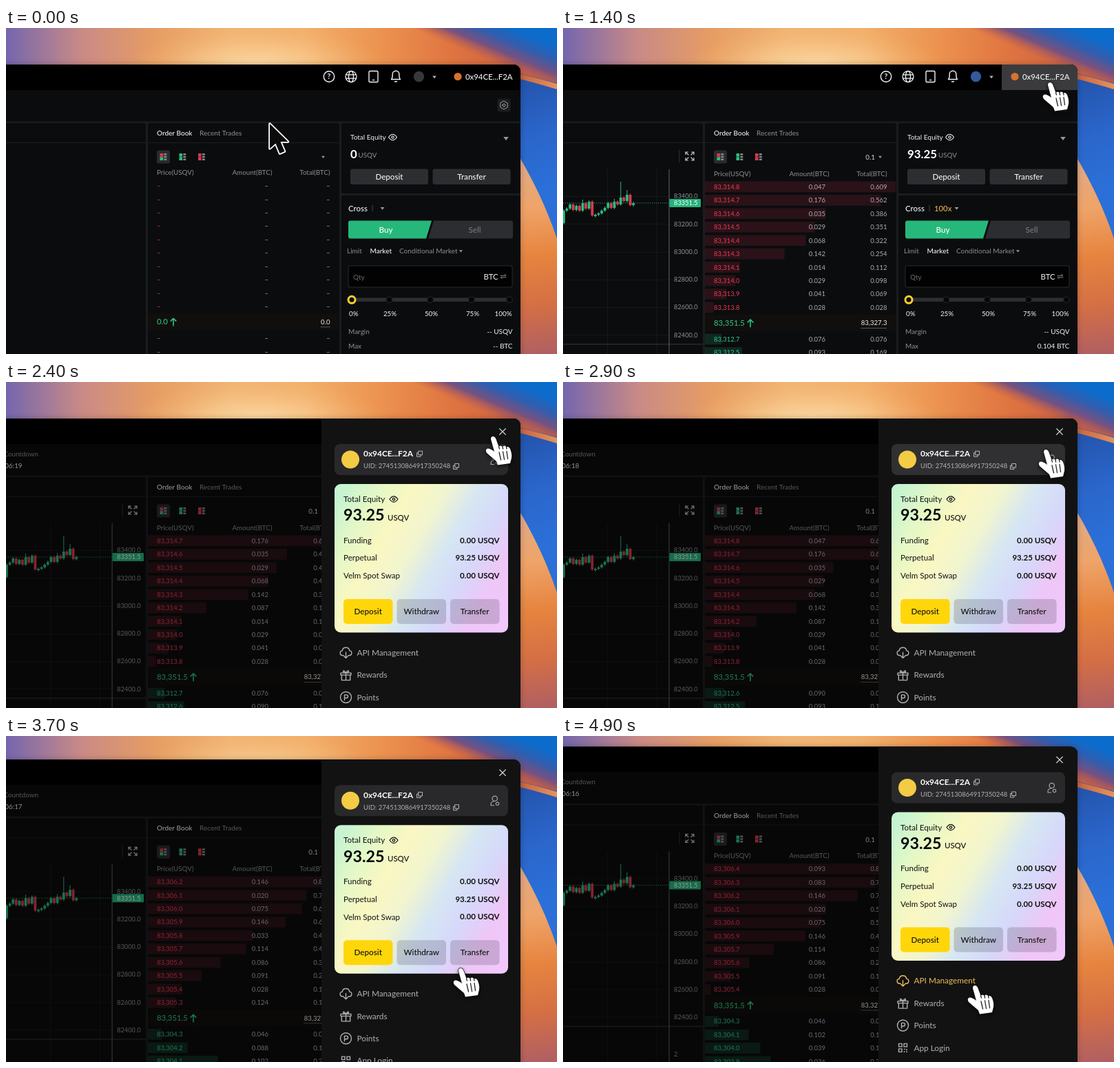
Write an HTML page with a canvas that moves like this. It is 800 px wide and 473 px high and loops after 5 s.

```html
<!DOCTYPE html>
<html lang="en">
<head>
<meta charset="utf-8">
<title>Trading account menu</title>
<style>
html, body { margin: 0; width: 100%; height: 100%; overflow: hidden; background: #000; }
canvas { display: block; width: 800px; height: 473px; }
</style>
</head>
<body>
<canvas id="stage" width="800" height="473"></canvas>
<script>
const c = document.getElementById('stage').getContext('2d');
const LOOP = 5000, STEP = 100;
const FONT = 'Lato, "Open Sans", sans-serif';
const COIN = 'USQV', WALLET = '0x94CE...F2A', UID = 'UID: 2745130864917350248';
const RED = '#de384f', GREEN = '#2bbd7e', WHITE = '#f2f2f2', GRAY = '#8e8f92', PANEL = '#0b0c0e';

// ---- drawing helpers
function txt(s, x, y, size, color, align = 'left', weight = 400) {
  c.font = `${weight} ${size}px ${FONT}`;
  c.textAlign = align;
  c.fillStyle = color;
  c.fillText(s, x, y + size * 0.36);
}
function box(x, y, w, h, color, r = 0) {
  c.beginPath();
  c.roundRect(x, y, w, h, r);
  c.fillStyle = color;
  c.fill();
}
function disc(x, y, r, color) {
  c.beginPath();
  c.arc(x, y, r, 0, 7);
  c.fillStyle = color;
  c.fill();
}
function ring(x, y, r, color, lw = 1.3) {
  c.beginPath();
  c.arc(x, y, r, 0, 7);
  c.strokeStyle = color;
  c.lineWidth = lw;
  c.stroke();
}
function icon(d, x, y, color, lw = 1.3, fill) {
  const p = new Path2D(d);
  c.save();
  c.translate(x, y);
  c.lineWidth = lw;
  c.lineJoin = c.lineCap = 'round';
  if (color) { c.strokeStyle = color; c.stroke(p); }
  if (fill) { c.fillStyle = fill; c.fill(p); }
  c.restore();
}
function shape(d, fill) { icon(d, 0, 0, null, 0, fill); }
function fade(g, colors) {
  colors.forEach((v, i) => g.addColorStop(i / (colors.length - 1), v));
  return g;
}
const grad = (x0, y0, x1, y1, ...colors) => fade(c.createLinearGradient(x0, y0, x1, y1), colors);
const caret = (x, y, s = 2.5, color = '#9a9a9d') =>
  icon(`M${-s} ${-s / 2}H${s}L0 ${s * 0.8}Z`, x, y, null, 0, color);

const ICON = {
  globe: 'M-8 0A8 8 0 1 0 8 0A8 8 0 1 0 -8 0ZM-3.5 0A3.5 8 0 1 0 3.5 0A3.5 8 0 1 0 -3.5 0ZM-7.5 -2.7H7.5M-7.5 2.7H7.5',
  phone: 'M-5 -8H5Q6.5 -8 6.5 -6.5V6.5Q6.5 8 5 8H-5Q-6.5 8 -6.5 6.5V-6.5Q-6.5 -8 -5 -8ZM-1 5H1',
  bell: 'M-6.5 4.5C-4.5 2.5 -4.8 0 -4.8 -3A4.8 4.8 0 0 1 4.8 -3C4.8 0 4.5 2.5 6.5 4.5ZM-1.5 7.7H1.5',
  eye: 'M-6 0Q0 -8.4 6 0Q0 8.4 -6 0ZM-1.7 0A1.7 1.7 0 1 0 1.7 0A1.7 1.7 0 1 0 -1.7 0Z',
  expand: 'M-2 -2L-6 -6M-6 -2.5V-6H-2.5M2 -2L6 -6M2.5 -6H6V-2.5M-2 2L-6 6M-6 2.5V6H-2.5M2 2L6 6M2.5 6H6V2.5',
  hex: 'M0 -6L5.2 -3V3L0 6L-5.2 3V-3ZM-2 0A2 2 0 1 0 2 0A2 2 0 1 0 -2 0Z',
  copy: 'M-1.5 -4H4V1.5H-1.5ZM-1.5 -1.5H-4V4H1.5V1.5',
  swap: 'M-4 -1.3H4L1.8 -3M4 1.3H-4L-1.8 3',
  up: 'M0 5.5V-5M-3.8 -1.2L0 -5L3.8 -1.2',
  close: 'M-4.3 -4.3L4.3 4.3M4.3 -4.3L-4.3 4.3',
  person: 'M-3.5 -3A3.7 3.7 0 1 0 3.9 -3A3.7 3.7 0 1 0 -3.5 -3ZM-1 7H-5.5Q-6 1.5 -1.5 1M1.8 4.5A2.2 2.2 0 1 0 6.2 4.5A2.2 2.2 0 1 0 1.8 4.5Z',
  cloud: 'M-3.5 4H-4.5C-9.5 4 -9.5 -2.5 -5.3 -2.8C-4.5 -9 4.5 -9 5.3 -2.8C9.5 -2.5 9.5 4 4.5 4H3.5M0 -0.5V7.8M-2.8 5L0 7.8L2.8 5',
  gift: 'M-7.5 -3H7.5V0H-7.5ZM-6.2 0V7.5H6.2V0M0 -3V7.5M0 -3C-6.5 -3 -4 -10 0 -3C4 -10 6.5 -3 0 -3',
  coin: 'M-8 0A8 8 0 1 0 8 0A8 8 0 1 0 -8 0ZM-2 4V-3.6H0.7A2.3 2.3 0 0 1 0.7 1H-2',
  login: 'M-6 -6H-1.5V-1.5H-6ZM1.5 -6H6V-1.5H1.5ZM-6 1.5H-1.5V6H-6ZM2 2H3M5.5 2V3.5M2 6V5M5 6H6'
};

// ---- timing
const clamp = v => Math.min(1, Math.max(0, v));
const drawerAt = t => 1 - (1 - clamp((t - 1750) / 500)) ** 3;
const scrollAt = t => 18.75 * (1 - Math.cos(Math.PI * clamp((t - 3070) / 1260)));

const PATH = [[0, 382, 136], [150, 382, 136], [1150, 707, 79], [2450, 707, 79], [2900, 701, 98],
  [3700, 660, 337], [4100, 637, 360], [4900, 598, 362], [5000, 598, 362]];

// monotone cubic through the path keys
function along(t, k) {
  const slope = i => (PATH[i + 1][k] - PATH[i][k]) / (PATH[i + 1][0] - PATH[i][0]);
  const tangent = i => {
    if (i === 0 || i === PATH.length - 1) return 0;
    const a = slope(i - 1), b = slope(i);
    return a * b > 0 ? 2 * a * b / (a + b) : 0;
  };
  let i = 0;
  while (i < PATH.length - 2 && t >= PATH[i + 1][0]) i++;
  const h = PATH[i + 1][0] - PATH[i][0], u = (t - PATH[i][0]) / h, v = 1 - u;
  return PATH[i][k] * v * v * (1 + 2 * u) + PATH[i + 1][k] * u * u * (3 - 2 * u) +
    h * u * v * (v * tangent(i) - u * tangent(i + 1));
}

// ---- market data: amounts in thousandths, one price tick of 0.1 per entry
const EARLY = { ask: 83314.8, asks: [47, 176, 35, 29, 68, 142, 87, 14, 29, 41, 28],
  bid: 83312.7, bids: [76, 90, 93, 60], bidScale: 320 };
const LATE = { ask: 83306.4, asks: [93, 83, 146, 20, 75, 146, 33, 114, 86, 91, 28, 124],
  bid: 83304.3, bids: [46, 88, 102, 39, 36], bidScale: 430 };
const BOOKS = [
  { at: 500, side: EARLY, skip: [6], skipBid: 1 },
  { at: 1700, side: EARLY, skip: [0], skipBid: -1 },
  { at: 2500, side: EARLY, skip: [7], skipBid: 0 },
  { at: 3300, side: LATE, skip: [0, 1], skipBid: -1 },
  { at: 4000, side: LATE, skip: [0, 11], skipBid: -1 },
  { at: 4500, side: LATE, skip: [6, 11], skipBid: 1 }
];
const price = v => v.toLocaleString('en-US', { minimumFractionDigits: 1, maximumFractionDigits: 1 });
const ladder = (top, sizes, hidden) =>
  sizes.map((n, i) => ({ p: top - i / 10, n, i })).filter(r => !hidden.includes(r.i));

// ---- scene
function wallpaper() {
  box(0, 0, 800, 110, grad(0, 0, 760, 0, '#7466ae', '#c98a86', '#e79d63', '#f0b473', '#f2b06c', '#ec9350', '#df7340', '#c65f45'));
  // pale fan of light above the window
  c.save();
  c.translate(365, 62);
  c.scale(1, 0.36);
  disc(0, 0, 190, fade(c.createRadialGradient(0, 0, 0, 0, 0, 190), ['#fde0b0', 'rgba(251,208,150,.55)', 'rgba(245,180,110,0)']));
  c.restore();
  // blue sky over the diagonal ridge
  box(540, 0, 260, 110, grad(668, 34, 691, -20, 'rgba(190,90,80,0)', '#76517f', '#2f5eb0', '#0c6ccc'));
  shape('M735 63L800 80V400H735Z', grad(747, 80, 800, 230, '#2455ae', '#2b66cb', '#2a70d8'));
  shape('M735 64Q770 72 800 81V89Q770 80 735 71Z', grad(747, 0, 800, 0, '#c8643f', '#e4935c'));
  shape('M735 170C757 205 782 252 800 306V473H735Z', grad(752, 190, 785, 473, '#dfa987', '#efa469', '#e6843f', '#d46f45', '#b05f63'));
}

function header(loaded, hover) {
  box(0, 53, 747, 37, '#000');
  if (hover) box(637, 53, 110, 37, '#3b3b3d');
  ring(469, 70.5, 7.7, WHITE, 1.4);
  txt('?', 469, 70.5, 10.5, WHITE, 'center', 700);
  icon(ICON.globe, 501, 70.5, WHITE);
  icon(ICON.phone, 533.5, 70.5, WHITE, 1.4);
  icon(ICON.bell, 566, 70, WHITE, 1.4);
  disc(599.5, 70.5, 7.7, loaded ? '#34589c' : '#37383b');
  caret(622, 71, 2.8, '#b5b5b5');
  disc(656, 70.5, 5.6, '#d9722e');
  txt(WALLET, 735.5, 70.5, 11.4, WHITE, 'right', 500);
}

function chart() {
  c.fillStyle = '#15171a';
  for (const x of [64, 136]) c.fillRect(x, 205, 1, 395);
  for (let i = 0; i < 6; i++) {
    const y = 244 + i * 40.25;
    c.fillStyle = '#15171a';
    c.fillRect(0, Math.round(y), 154, 1);
    txt(`${83400 - i * 200}.0`, 161, y, 9.3, GRAY);
  }
  box(0, 458, 203, 1.5, '#292a2d');
  txt('2', 161, 499, 9.3, GRAY);
  box(153.5, 205, 1.2, 400, '#55575b');

  const closes = [265, 262, 256, 264, 258, 265, 254, 262, 252, 272, 271, 269, 265, 261, 254, 261,
    252, 256, 246, 251, 242, 257, 254];
  const wicks = { 18: 223, 20: 235, 6: 249, 16: 248 };
  let open = 283;
  closes.forEach((y, i) => {
    const x = 1 + i * 4.6, top = Math.min(open, y), h = Math.max(2, Math.abs(open - y));
    const from = wicks[i] || top - 2;
    c.fillStyle = y > open ? RED : GREEN;
    c.fillRect(x - 0.5, from, 1, top + h + 2 - from);
    c.fillRect(x - 1.9, top, 3.8, h);
    open = y;
  });
  c.fillStyle = '#2a8f63';
  for (let x = 0; x < 154; x += 3) c.fillRect(x, 253.5, 1.3, 1);
  box(154.5, 248, 45.5, 12, '#24b47b', 1);
  txt('83351.5', 161, 254, 9.3, '#fff');
  box(168.5, 177, 1, 18, '#333438');
  icon(ICON.expand, 184, 186, '#c4c4c6', 1.2);
}

function bookIcon(x, a, b) {
  box(x - 4.5, 182, 4.6, 4.7, a);
  box(x - 4.5, 187.3, 4.6, 4.7, b);
  for (let i = 0; i < 3; i++) box(x + 1.3, 182 + i * 3.7, 4, 2.5, '#85868a');
}

function orderBook(book) {
  const dy = book ? 1.7 : 0, row = i => 228.7 + dy + i * 19.45;
  txt('Order Book', 219, 152.5, 10, WHITE, 'left', 500);
  txt('Recent Trades', 281, 152.5, 10, GRAY);
  box(219, 177.5, 19, 19, '#2a2b2e', 3);
  bookIcon(228, RED, GREEN);
  bookIcon(256, GREEN, GREEN);
  bookIcon(283.5, RED, RED);
  caret(460.5, 187);
  if (book) txt('0.1', 453, 187.5, 9.8, '#d5d5d7', 'right');
  txt('Price(' + COIN + ')', 219, 209.3 + dy, 9.8, GRAY);
  txt('Amount(BTC)', 386.5, 209.3 + dy, 9.8, GRAY, 'right');
  txt('Total(BTC)', 470.5, 209.3 + dy, 9.8, GRAY, 'right');

  const cells = (y, color, p, n, sum) => {
    txt(p, 219, y, 9.5, color, 'left', 500);
    txt(n, 381, y, 9.5, '#acadb0', 'right');
    txt(sum, 470.5, y, 9.5, '#acadb0', 'right');
  };
  const fix = n => (n / 1000).toFixed(3);
  const mid = 426.3 + dy;
  box(206, mid - 12, 278, 24, '#110f0d');
  if (!book) {
    for (let i = 0; i < 10; i++) cells(row(i), RED, '–', '–', '–');
    for (let i = 0; i < 4; i++) cells(450 + i * 19.45, GREEN, '–', '–', '–');
  } else {
    const { side } = book;
    const asks = ladder(side.ask, side.asks, book.skip);
    const total = asks.reduce((s, r) => s + r.n, 0);
    let sum = total;
    asks.forEach((r, i) => {
      box(206, row(i) - 7.8, 277 * sum / total, 15.6, 'rgba(222,56,79,.15)');
      cells(row(i), RED, price(r.p), fix(r.n), fix(sum));
      sum -= r.n;
    });
    ladder(side.bid, side.bids, [book.skipBid]).forEach((r, i) => {
      const y = 451.5 + i * 19.45;
      sum += r.n;
      box(206, y - 7.8, side.bidScale * sum / 1000, 15.6, 'rgba(43,189,126,.16)');
      cells(y, GREEN, price(r.p), fix(r.n), fix(sum));
    });
  }
  txt(book ? '83,351.5' : '0.0', 219, mid, 11.4, GREEN, 'left', 500);
  icon(ICON.up, book ? 272 : 243, mid, GREEN, 1.7);
  const last = !book ? '0.0' : book === BOOKS[0] ? '83,327.3' : '83,327.6';
  txt(last, 470.5, mid, 9.6, WHITE, 'right');
  c.fillStyle = '#a0a0a3';
  for (let x = 470.5 - c.measureText(last).width; x < 470; x += 2) c.fillRect(x, mid + 7, 1, 1);
}

function tradePanel(loaded) {
  txt('Total Equity', 500, 158.5, 10, WHITE);
  icon(ICON.eye, 561.5, 158.5, WHITE, 1.1);
  caret(726, 160, 3.8);
  txt(loaded ? '93.25' : '0', 500, 182.5, 16.8, '#fff', 'left', 700);
  txt(COIN, loaded ? 545 : 511.5, 184.5, 9.8, GRAY);
  box(500, 204.5, 113, 22.5, '#2d2e31', 3);
  box(619.5, 204.5, 113, 22.5, '#2d2e31', 3);
  txt('Deposit', 556.5, 215.8, 11.6, WHITE, 'center', 500);
  txt('Transfer', 676, 215.8, 11.6, WHITE, 'center', 500);

  txt('Cross', 497, 261.5, 11.4, WHITE, 'left', 500);
  box(531.5, 257, 1, 9, '#444549');
  if (loaded) txt('100x', 539, 261.5, 11.3, '#e3ac4d', 'left', 500);
  caret(loaded ? 571.5 : 546.5, 261.5, 2.9);

  shape('M500 279.5H618L610 305.5H500Q497 305.5 497 302.5V282.5Q497 279.5 500 279.5Z', '#26b87b');
  shape('M621 279.5H733Q736 279.5 736 282.5V302.5Q736 305.5 733 305.5H613Z', '#2c2d30');
  txt('Buy', 551.5, 292.5, 11.6, '#fff', 'center', 500);
  txt('Sell', 680.5, 292.5, 11.6, '#77787b', 'center', 500);

  txt('Limit', 495, 323.3, 10, GRAY);
  txt('Market', 528.5, 323.3, 10, WHITE, 'left', 500);
  txt('Conditional Market', 571, 323.3, 10, GRAY);
  caret(660.5, 323.5);

  box(496.5, 344.5, 239, 32, '#2a2b2e', 3);
  box(497.5, 345.5, 237, 30, '#020202', 2);
  txt('Qty', 504, 361, 10, '#6d6e72');
  txt('BTC', 714.5, 360.5, 11.3, WHITE, 'right');
  icon(ICON.swap, 722, 360.5, '#8a8b8e', 1);

  box(502, 391.5, 229, 5.5, '#2d2e31', 2.5);
  [502, 556.5, 616, 676, 731].forEach((x, i) => {
    disc(x, 394.3, i ? 4.6 : 5, '#060606');
    ring(x, 394.3, i ? 4.3 : 5, i ? '#222326' : '#f7d02c', i ? 1.2 : 3);
  });
  txt('0%', 498, 414.3, 9.8, WHITE);
  ['25%', '50%', '75%'].forEach((s, i) => txt(s, 557.5 + i * 60, 414.3, 9.8, WHITE, 'center'));
  txt('100%', 734.5, 414.3, 9.8, WHITE, 'right');
  txt('Margin', 497, 440.3, 10, GRAY);
  txt('-- ' + COIN, 735.5, 440.3, 10, WHITE, 'right');
  txt('Max', 497, 461.3, 10, GRAY);
  txt((loaded ? '0.104' : '--') + ' BTC', 735.5, 461.3, 10, WHITE, 'right');
}

function page(t, hover) {
  const book = BOOKS.filter(b => t >= b.at).pop(), loaded = t >= 600;
  box(0, 53, 747, 560, '#1b1c1e');
  box(0, 90, 747, 45.5, PANEL);
  box(-5, 138, 208, 480, PANEL, 3);
  box(206, 138, 278, 480, PANEL, 3);
  box(487, 138, 260, 102, PANEL, 3);
  box(487, 243, 260, 380, PANEL, 3);
  box(0, 166, 203, 1, '#1d1e20');
  box(206, 166, 278, 1, '#1d1e20');
  header(loaded, hover);
  box(713.5, 102.5, 19, 19, '#1c1d1f', 3);
  icon(ICON.hex, 723, 112, '#a0a0a3', 1);
  if (t >= 1500) {
    txt('Countdown', 47, 104, 9.8, GRAY, 'right');
    txt('00:06:' + (19 - Math.floor((t - 1500) / 1000)), 23.5, 121.3, 9.8, WHITE, 'right');
  }
  if (t >= 700) chart();
  orderBook(book);
  tradePanel(loaded);
}

function drawer(x, y) {
  box(458, 53, 300, 560, '#121213');
  icon(ICON.close, 721, 72, '#c8c8ca', 1.3);

  const over = x > 477 && y > 90 && y < 135;
  box(477, 90, 252, 45, over ? '#303032' : '#29292b', 8);
  disc(500, 112.5, 13, '#f3cb45');
  txt(WALLET, 519, 104, 11.9, '#fff', 'left', 700);
  icon(ICON.copy, 600.5, 104.3, '#b5b5b7', 1);
  txt(UID, 519, 122, 9.5, '#b2b2b4');
  icon(ICON.copy, 653.5, 122.5, '#b5b5b7', 1);
  icon(ICON.person, 709.5, 112.5, '#a8a8aa', 1.2);

  box(477, 148, 252, 215.5, grad(477, 180, 735, 330, '#c6f4d0', '#e4f8c6', '#faf7c2', '#f1f5cf',
    '#d6e6f3', '#d6d8fa', '#efc6f7', '#f0c8fb'), 9);
  const ink = '#111';
  txt('Total Equity', 490, 170, 11.7, ink);
  icon(ICON.eye, 563, 170, ink, 1.2);
  txt('93.25', 490, 193, 23.3, '#050505', 'left', 700);
  txt(COIN, 554, 196.8, 11.4, ink, 'left', 500);
  [['Funding', '0.00'], ['Perpetual', '93.25'], ['Velm Spot Swap', '0.00']].forEach(([name, v], i) => {
    const ry = 229.5 + i * 25.8;
    txt(name, 490, ry, 11.6, ink);
    txt(v + ' ' + COIN, 716.5, ry, 11.5, ink, 'right', 700);
  });
  ['Deposit', 'Withdraw', 'Transfer'].forEach((s, i) => {
    const bx = 490 + i * 77.5;
    box(bx, 315, 71.5, 36, i ? 'rgba(60,60,80,.22)' : '#ffd60a', 5);
    txt(s, bx + 35.7, 333, 11.7, ink, 'center', 500);
  });

  [['API Management', 'cloud'], ['Rewards', 'gift'], ['Points', 'coin'], ['App Login', 'login']].forEach(([s, ic], i) => {
    const my = 392.7 + i * 32.4, on = x > 477 && Math.abs(y - my) < 15;
    const color = on ? '#ecbd55' : '#b0b0b2';
    icon(ICON[ic], 493.5, my, color, 1.4);
    txt(s, 509.5, my, 11.8, color);
  });
}

function pointer(x, y, hand) {
  if (!hand) {
    icon('M1 3V39L9.5 31.5L15.5 46L22.5 43L16.5 29H27.5Z', x, y, '#fff', 3.6, '#0b0b0c');
    return;
  }
  c.save();
  c.shadowColor = 'rgba(0,0,0,.5)';
  c.shadowBlur = 5;
  c.shadowOffsetY = 2;
  icon('M-3 4Q-3 0 0 0Q3 0 4.5 4L8.5 15Q11 12 14 15Q17 12 19.5 15.5Q23 14 25 18Q28 26 27 31L25 39L7 41.5L5 36' +
    'Q-2 30 -9 24Q-12 19 -8 17.5Q-4 17 2 22Z', x, y, '#111', 1.4, '#fff');
  c.restore();
  icon('M9 23L11.5 34M14.5 22L16.5 33.5M20 21.5L21.5 32.5M8.5 15L9.5 18M14 15L14.6 18M19.5 15.5L20 18', x, y, '#222', 1.3);
}

function draw(t) {
  const x = along(t, 1), y = along(t, 2), open = drawerAt(t), scroll = scrollAt(t);
  const hover = x > 637 && y < 90 && open < 1;
  wallpaper();
  c.save();
  c.translate(0, -scroll);
  c.save();
  c.shadowColor = 'rgba(0,0,0,.25)';
  c.shadowBlur = 8;
  box(-20, 53, 767, 580, '#000', 10);
  c.restore();
  c.beginPath();
  c.roundRect(-20, 53, 767, 580, 10);
  c.clip();
  page(t, hover);
  if (open > 0) {
    box(0, 53, 747, 560, `rgba(0,0,0,${0.4 * open})`);
    c.translate(289 * (1 - open), 0);
    drawer(x, y + scroll);
  }
  c.restore();
  pointer(x, y, hover || open > 0);
}

const start = performance.now();
function tick() {
  const t = (performance.now() - start) % LOOP;
  draw(Math.floor(t / STEP) * STEP);
  requestAnimationFrame(tick);
}
tick();
</script>
</body>
</html>
```
